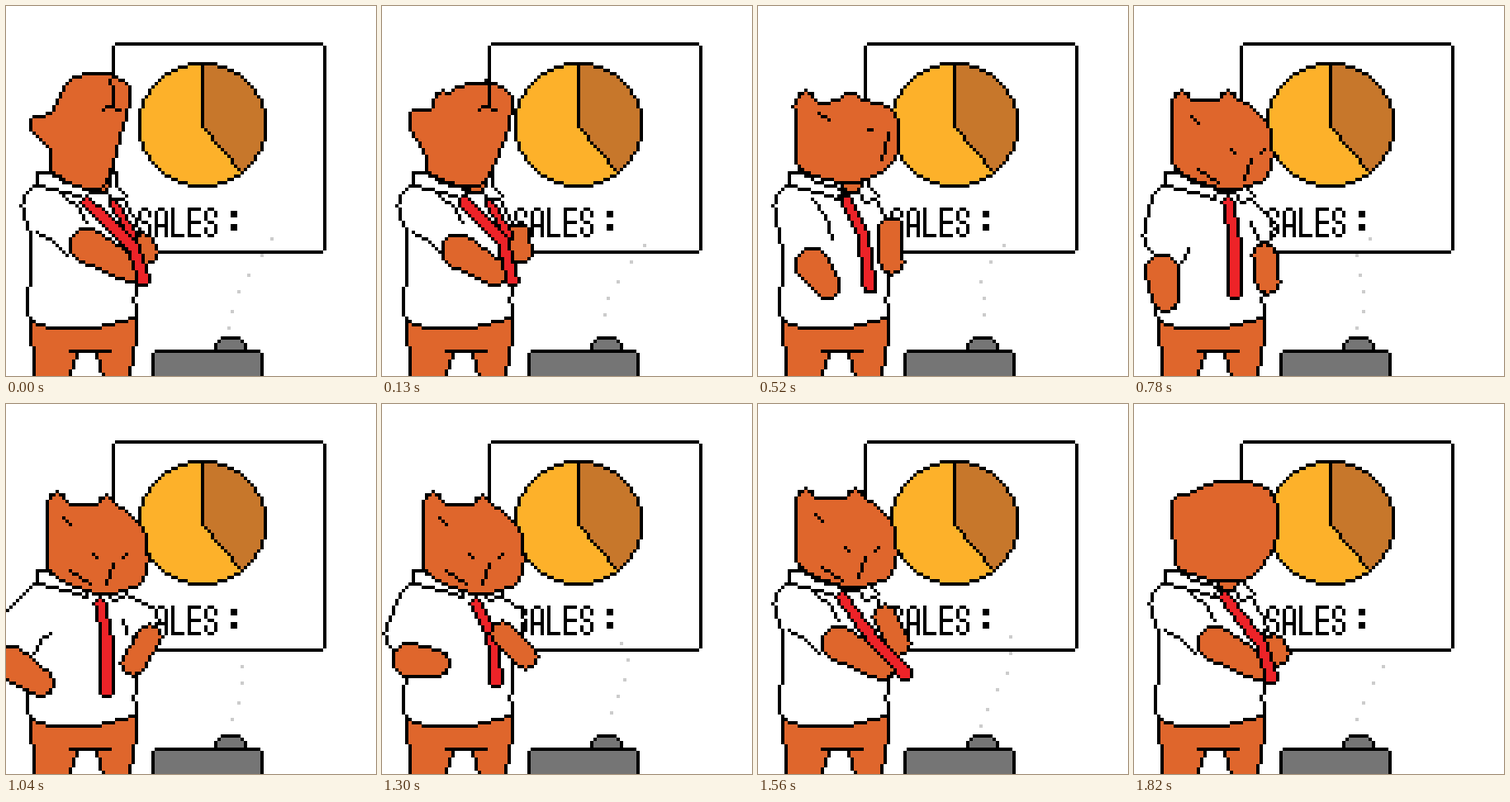
Recreate the animation shown at these times as an HTML page with a canvas. Size 448x448 px, loop 1950 ms.

```html
<!DOCTYPE html>
<html lang="en">
<head>
<meta charset="utf-8">
<title>Sales talk</title>
<style>
  html, body { margin: 0; height: 100%; overflow: hidden; background: #fff; }
  canvas { display: block; width: 100vw; height: 100vh; image-rendering: pixelated; }
</style>
</head>
<body>
<canvas id="stage" width="112" height="112" role="img" aria-label="SALES :"></canvas>
<script>
const ctx = document.getElementById('stage').getContext('2d');
const SIZE = 112, STEP = 130, STEPS = 15;
const ORANGE = '#df662c', RED = '#ed2328', YELLOW = '#fdb12a', BROWN = '#c7772b',
      GRAY = '#757575', DOT = '#cccccc', WHITE = '#fff', BLACK = '#000';

const parse = text => text.split(' ').map(pair => pair.split(',').map(Number));

// Head contours share a point count, so one can turn into another.
const heads = {
  raised: '14,50 13,43 7,37 8,33 13,32 19,22 29,20 37,25 34,39 28,55',
  side:   '14,50 11,45 11,36 11,28 19,29 30,28 39,29 42,32 41,44 29,52',
  front:  '14,50 11,46 11,36 11,28 18,28 31,28 37,32 41,38 40,51 27,55',
  back:   '14,50 12,43 11,35 12,28 18,26 25,23 34,23 42,28 42,42 32,53'
};
const faces = {
  raised: ['31,22 32,25 32,29 30,30 29,31', '32,30 34,31'],
  side: ['18,32 21,34', '33,37 34,37', '39,38 38,43 37,46'],
  front: ['17,33 19,35', '19,49 25,53'],
  back: []
};

// Sleeves end at the elbows; forearms and ties are tapered limbs.
const crossed = {
  elbowL: '13,66', armL: '24,72 37,79', elbowR: '35,67', armR: '41,72 42,74',
  folds: ['9,68 14,71 18,75', '17,57 21,60 24,65']
};
const poses = [
  { ...crossed, at: 0, head: 'raised', ears: '20,28 30,26', tie: '24,59 38,72 41,82', tail: '32,59 38,69' },
  { at: 3, head: 'side', ears: '14,28 27,28', elbowL: '14,68', armL: '20,77 26,82',
    elbowR: '34,67', armR: '40,63 40,74', tie: '25,58 32,68 35,84', folds: ['16,58 20,63 22,70'] },
  { at: 6, head: 'front', look: 34, ears: '14,28 28,28', elbowL: '9,69', armL: '8,80 9,88',
    elbowR: '37,67', armR: '39,75 40,83', tie: '28,59 30,70 30,86', folds: ['16,73 14,77', '35,65 38,72'] },
  { at: 8, head: 'front', look: 31, shift: 2, ears: '15,29 30,30', elbowL: '3,69', armL: '1,78 10,84',
    elbowR: '41,65', armR: '43,70 38,78', tie: '28,60 30,70 30,86', folds: ['8,75 10,71 13,69', '35,65 36,69'] },
  { at: 10, head: 'front', look: 31, shift: 2, ears: '15,29 30,30', elbowL: '7,69', armL: '8,77 16,78',
    elbowR: '38,65', armR: '36,69 43,76', tie: '28,60 33,70 34,83', tieBehind: true, folds: [] },
  { ...crossed, at: 12, head: 'front', look: 31, ears: '14,28 29,28',
    armR: '38,64 42,72', tie: '25,58 33,69 44,81' },
  { ...crossed, at: 14, head: 'back', ears: '18,32 32,30', armR: '42,73 43,75', tie: '27,58 38,72 41,82' }
];

function box(x, y, w, h, color) {
  ctx.fillStyle = color;
  ctx.fillRect(x, y, w, h);
}

function stroke(points) {
  points.slice(1).forEach(([x1, y1], i) => {
    const [x0, y0] = points[i];
    const n = Math.max(Math.abs(x1 - x0), Math.abs(y1 - y0)) || 1;
    for (let k = 0; k <= n; k++)
      box(Math.round(x0 + (x1 - x0) * k / n), Math.round(y0 + (y1 - y0) * k / n), 1, 1, BLACK);
  });
}

// Shapes are tests telling whether a cell belongs to them.
const limb = (points, r0, r1 = r0) => (x, y) => points.some(([bx, by], i) => {
  if (!i) return false;
  const [ax, ay] = points[i - 1], dx = bx - ax, dy = by - ay;
  const t = Math.min(1, Math.max(0, ((x - ax) * dx + (y - ay) * dy) / (dx * dx + dy * dy || 1)));
  const r = r0 + (r1 - r0) * (i - 1 + t) / (points.length - 1);
  return (x - ax - dx * t) ** 2 + (y - ay - dy * t) ** 2 <= r * r;
});

const any = (...tests) => (x, y) => tests.some(test => test(x, y));

function polygon(points) {
  const closed = [...points, points[0]];
  const onEdge = limb(closed, 0.5);
  return (x, y) => {
    let inside = false;
    for (let i = 1; i < closed.length; i++) {
      const [ax, ay] = closed[i - 1], [bx, by] = closed[i];
      if ((ay <= y) !== (by <= y) && x < ax + (y - ay) * (bx - ax) / (by - ay)) inside = !inside;
    }
    return inside || onEdge(x, y);
  };
}

// Closed Catmull-Rom curve through the points.
function smooth(points) {
  const n = points.length, at = i => points[(i + n) % n];
  return points.flatMap((p, i) => [0, 0.25, 0.5, 0.75].map(t => [0, 1].map(k => {
    const a = at(i - 1)[k], b = p[k], c = at(i + 1)[k], d = at(i + 2)[k];
    return b + t / 2 * (c - a + t * (2 * a - 5 * b + 4 * c - d + t * (3 * (b - c) + d - a)));
  })));
}

// Fill cells with a colour (or a colour rule) and outline the border cells.
function paint(test, color) {
  const cells = Array.from({ length: SIZE }, (_, y) => Array.from({ length: SIZE }, (_, x) => test(x, y)));
  const open = (x, y) => cells[y]?.[x] === false;
  cells.forEach((row, y) => row.forEach((on, x) => {
    if (!on) return;
    const edge = open(x - 1, y) || open(x + 1, y) || open(x, y - 1) || open(x, y + 1);
    box(x, y, 1, 1, edge ? BLACK : typeof color === 'function' ? color(x, y) : color);
  }));
}

const glyphs = {
  S: ['3,2 3,1 2,0 1,0 0,1 0,3 3,5 3,7 2,8 1,8 0,7 0,6'],
  A: ['0,8 0,1 1,0 2,0 3,1 3,8', '0,5 3,5'],
  L: ['0,0 0,8 3,8'],
  E: ['3,0 0,0 0,8 3,8', '0,4 3,4']
};

function drawBoard() {
  for (const y of [11, 74]) box(33, y, 63, 1, BLACK);
  for (const x of [32, 96]) box(x, 12, 1, 62, BLACK);
  paint((x, y) => ((x - 59) / 19.6) ** 2 + ((y - 35.5) / 19) ** 2 <= 1,
    (x, y) => x > 59 && (y - 36) * 12 < (x - 59) * 14 ? BROWN : YELLOW);
  stroke([[59, 17], [59, 36], [71, 50]]);
  [...'SALES'].forEach((letter, i) => glyphs[letter].forEach(part =>
    stroke(parse(part).map(([x, y]) => [x + 40 + i * 5, y + 61]))));
  for (const y of [62, 66]) box(68, y, 2, 2, BLACK);
}

// Specks rise from the pot and drift apart.
function drawSteam(step) {
  for (let i = 0; i < 10; i++) {
    const age = (step + i * 1.5) % STEPS;
    const drift = 1.7 * Math.sin(i * 12.9);
    if (age < 8) box(Math.round(67 + drift * age), Math.round(97 - 3.6 * age), 1, 1, DOT);
  }
}

function drawPot() {
  paint(polygon(parse('63,104 63,102 65,100 70,100 72,102 72,104')), GRAY);
  box(45, 104, 32, 1, BLACK);
  box(44, 105, 34, 7, BLACK);
  box(45, 105, 32, 7, GRAY);
}

function drawTrousers() {
  paint(polygon(parse('7,94 39,94 39,101 38,104 37,113 29,113 28,108 27,104 21,104 20,108 18,113 8,113 8,103 7,101')), ORANGE);
  stroke(parse('19,104 31,104'));
}

function drawFace({ head, look, shift = 0 }) {
  faces[head].forEach(mark => stroke(parse(mark).map(([x, y]) => [x, y + shift / 2])));
  if (!look) return;
  stroke([[look - 5, 43 + shift], [look - 4, 44 + shift]]);
  stroke([[look + 5, 43 + shift], [look + 4, 44 + shift]]);
  stroke([[look + 1, 46 + shift], [look - 1, 52 + shift]]);
}

function draw(step) {
  const index = poses.findLastIndex(p => p.at <= step);
  const from = poses[index], to = poses[(index + 1) % poses.length];
  const mix = (step - from.at) / ((to.at || STEPS) - from.at);
  const near = mix < 0.5 ? from : to;
  const blend = read => {
    const end = parse(read(to));
    return parse(read(from)).map((p, i) => p.map((v, k) => v + (end[i][k] - v) * mix));
  };

  box(0, 0, SIZE, SIZE, WHITE);
  drawSteam(step);
  drawBoard();
  drawPot();
  drawTrousers();

  const torso = polygon(parse('9,53 7,58 7,84 6,86 6,93 9,96 14,97 27,97 34,95 39,94 39,91 38,89 39,86 39,75 34,56 26,56 18,55'));
  paint(any(torso,
    limb([[11, 60], ...blend(p => p.elbowL)], 7),
    limb([[31, 60], ...blend(p => p.elbowR)], 5)), WHITE);
  near.folds.forEach(fold => stroke(parse(fold)));
  paint(polygon(parse('31,50 33,50 33,54 36,57 32,59 30,56')), WHITE);
  paint(polygon(parse('9,50 13,50 17,53 25,55 24,58 18,56 9,54')), WHITE);
  paint(limb([[28, 49], [28, 53]], 3.2), ORANGE);

  const drawTie = () => {
    if (near.tail) paint(limb(parse(near.tail), 1.6), RED);
    paint(limb(blend(p => p.tie), 2, 2.3), RED);
  };
  if (near.tieBehind) drawTie();
  paint(limb(blend(p => p.armR), 4), ORANGE);
  paint(limb(blend(p => p.armL), 5.6, 4.4), ORANGE);
  if (!near.tieBehind) drawTie();

  const tilt = (from.shift || 0) * (1 - mix) + (to.shift || 0) * mix;
  const contour = blend(p => heads[p.head]).map(([x, y]) => [x + tilt / 2, y + tilt]);
  const ears = blend(p => p.ears).map(([x, y]) => limb([[x, y], [x, y + 4]], 3));
  paint(any(polygon(smooth(contour)), ...ears), ORANGE);
  drawFace(near);
}

let shown = -1;
function tick() {
  const step = Math.floor(performance.now() / STEP) % STEPS;
  if (step !== shown) draw(shown = step);
  requestAnimationFrame(tick);
}
tick();
</script>
</body>
</html>
```
